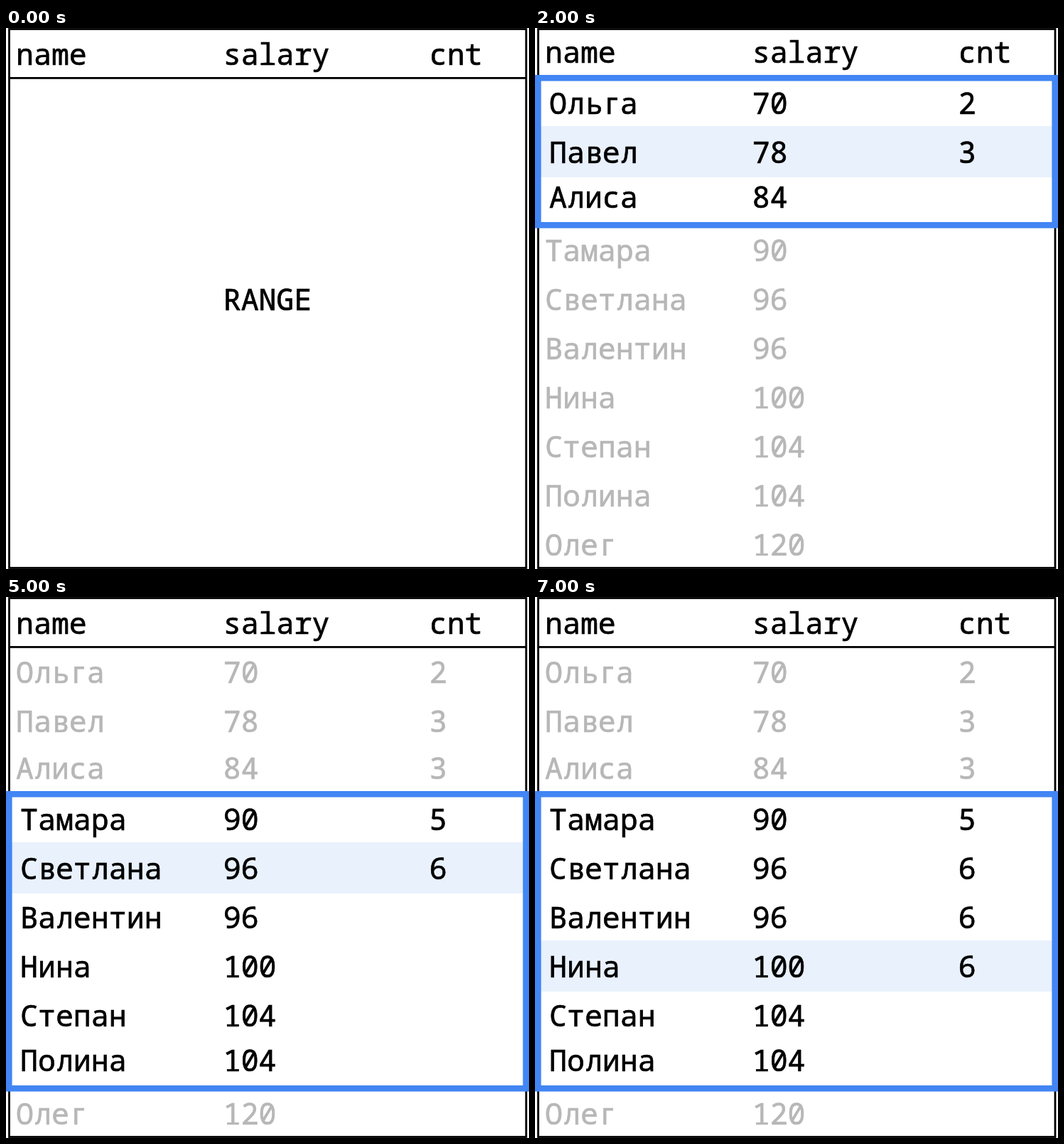
An HTML page for the animation above (8 s loop, 736 by 761 pixels).

```html
<!DOCTYPE html>
<html lang="ru">
<head>
<meta charset="utf-8">
<style>
  html, body { margin: 0; width: 100%; height: 100%; overflow: hidden; background: #fff; }
  svg { display: block; }
  text { font: 41.6px "Noto Sans Mono", "DejaVu Sans Mono", monospace; stroke-width: .7px; }
</style>
</head>
<body>
<svg id="stage" width="736" height="761" viewBox="0 0 736 761"></svg>
<script>
const stage = document.getElementById("stage");
const names = ["Ольга", "Павел", "Алиса", "Тамара", "Светлана", "Валентин", "Нина", "Степан", "Полина", "Олег"];
const salaries = [70, 78, 84, 90, 96, 96, 100, 104, 104, 120];
const ROW = 69, REACH = 10, STEP = 1000, STEPS = 8;
const NAME_X = 14, SALARY_X = 305.7, COUNT_X = 595.7;
const BLUE = "#4285f4", PALE = "#e9f1fd", GRAY = "#b7b7b7", BLACK = "#000";

const text = (x, y, value, color = BLACK) =>
  `<text x="${x}" y="${y}" fill="${color}" stroke="${color}">${value}</text>`;
const rect = (x, y, w, h, attrs) => `<rect x="${x}" y="${y}" width="${w}" height="${h}" ${attrs}/>`;

// First and last row whose salary lies within REACH of the current row's
function rangeOf(row) {
  const inside = salary => Math.abs(salary - salaries[row]) <= REACH;
  return [salaries.findIndex(inside), salaries.findLastIndex(inside)];
}

function tableRow(i, current, first, last) {
  const active = i >= first && i <= last;
  const shift = i === last ? -6 : i === first - 1 ? -3 : 0;
  const y = 121 + ROW * i + shift;
  const color = active ? BLACK : GRAY;
  const [from, to] = rangeOf(i);
  return text(active ? NAME_X + 6 : NAME_X, y, names[i], color)
    + text(SALARY_X, y, salaries[i], color)
    + (i <= current ? text(COUNT_X, y, to - from + 1, color) : "");
}

function draw(step) {
  const current = step - 1;
  const [first, last] = step ? rangeOf(current) : [];
  const headerY = first === 0 ? 49 : 52;
  let svg = rect(4.5, 1.5, 727.5, 758, `fill="#fff" stroke="${BLACK}" stroke-width="2.8"`)
    + rect(4.5, 69, 727.5, 2.8, `fill="${BLACK}"`)
    + text(NAME_X, headerY, "name") + text(SALARY_X, headerY, "salary") + text(COUNT_X, headerY, "cnt");

  if (step) {
    const top = 66 + ROW * first, bottom = 143.6 + ROW * last, markTop = ROW * step;
    svg += rect(4.3, top + 4.3, 727.4, bottom - top - 8.6, `fill="#fff"`)
      + rect(8, markTop, 720, 72, `fill="${PALE}"`)
      + rect(4.3, top + 4.3, 727.4, bottom - top - 8.6, `fill="none" stroke="${BLUE}" stroke-width="8.6"`)
      + names.map((_, i) => tableRow(i, current, first, last)).join("");
  } else {
    svg += text(SALARY_X, 397, "RANGE");
  }
  stage.innerHTML = svg;
}

let shown = -1;
function tick() {
  const step = Math.floor(performance.now() / STEP) % STEPS;
  if (step !== shown) draw(shown = step);
  requestAnimationFrame(tick);
}
tick();
</script>
</body>
</html>
```
